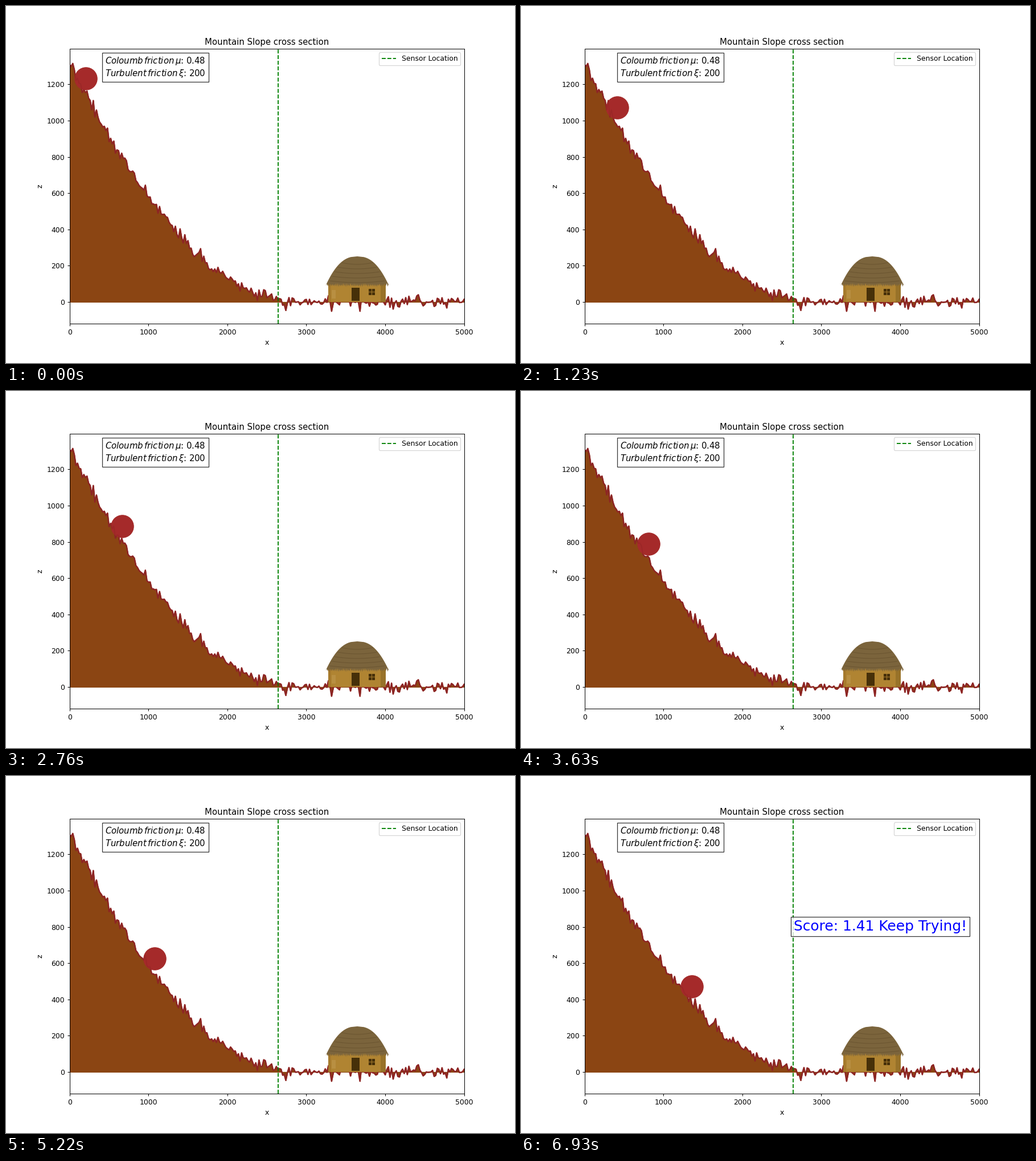
Recreate the animation shown at these times as a matplotlib script. Size 894 px wide and 626 px high, loop 8000 ms.

```python
import math

import matplotlib.pyplot as plt
import numpy as np
from matplotlib.animation import FuncAnimation
from matplotlib.patches import Polygon, Rectangle
from matplotlib.transforms import Affine2D

W, H, DPI = 894, 626, 89.4
FRAMES, INTERVAL = 250, 32
STEP_MS, LAST_STEP = 30, 231
PEAK, FOOT = 1320, 2800

# The small margin keeps the canvas from rounding down a pixel
fig, ax = plt.subplots(figsize=((W + 0.01) / DPI, (H + 0.01) / DPI), dpi=DPI)
pixels = Affine2D().scale(1 / W, -1 / H).translate(0, 1) + fig.transFigure
rng = np.random.default_rng(4)


def slope(x):
    return PEAK * np.clip(1 - x / FOOT, 0, 1) ** 1.85


def poly(points, color):
    ax.add_patch(Polygon(points, color=color, lw=0, zorder=4,
                         transform=pixels))


def rect(x0, y0, x1, y1, color):
    ax.add_patch(Rectangle((x0, y0), x1 - x0, y1 - y0, color=color, lw=0,
                           zorder=4, transform=pixels))


def draw_terrain():
    x = np.arange(0, 5001, 20)
    z = slope(x) + np.clip(rng.normal(0, 18, x.size), -51, 54)
    ax.fill_between(x, z, color="saddlebrown", zorder=1)
    ax.plot(x, z, color="#922626", lw=2, zorder=2)
    # Faint trace of the ground across the ball
    ax.plot(x, z, color="#802020", lw=1.5, alpha=0.25, zorder=3.5)


def roof_half(y):
    return 54 * ((y - 439) / 48) ** 0.42


def draw_hut():
    mid = 617
    # Walls
    rect(566, 484, 667, 519.5, "#b08432")
    rect(566, 484, 571, 519.5, "#a67a2c")
    rect(572, 498, 579, 513, "#b88f42")
    rect(658, 484, 667, 519.5, "#987229")
    # Door and window
    rect(607, 494, 620.5, 517, "#463009")
    rect(637, 496.5, 648, 507, "#463009")
    rect(642, 496.5, 643, 507, "#a67a2c")
    rect(637, 501, 648, 502, "#a67a2c")
    # Thatched roof with ragged eaves
    y = np.linspace(439, 487, 40)
    half = roof_half(y)
    eaves = np.linspace(mid + 55, mid - 55, 70)
    ragged = 487 + 4.5 * (np.arange(70) % 2) + rng.uniform(-1, 1, 70)
    xs = np.concatenate([mid - half[::-1], mid + half, eaves])
    ys = np.concatenate([y[::-1], y, ragged])
    poly(np.column_stack([xs, ys]), "#7b643c")
    for y in range(450, 485, 8):
        x = np.linspace(-1, 1, 40)
        ax.plot(mid + 0.93 * roof_half(y) * x, y + 3 - 3 * x ** 2,
                color="#6b5531", lw=0.8, zorder=4.5, transform=pixels)


def boxed(x, z, text, **style):
    return ax.text(x, z, text, va="center", zorder=5,
                   bbox=dict(facecolor="white", alpha=0.8), **style)


draw_terrain()
draw_hut()
ax.set(xlim=(0, 5000), ylim=(-120, 1396), xlabel="x", ylabel="z",
       title="Mountain Slope cross section")
sensor = ax.axvline(2640, color="green", ls="--", label="Sensor Location")
ax.legend(handles=[sensor], loc="upper right")
boxed(450, 1294, "$Coloumb\\/friction\\/\\mu$: 0.48\n"
                 "$Turbulent\\/friction\\/\\xi$: 200", fontsize=12)
score = boxed(3750, 801, "Score: 1.41 Keep Trying!", fontsize=20,
              color="blue", ha="center")
ball, = ax.plot([], [], "o", color="brown", ms=31.6, zorder=3)


def update(frame):
    step = min(math.ceil(frame * INTERVAL / STEP_MS), LAST_STEP)
    x = 205 + 5 * step
    ball.set_data([x], [slope(x) + 86])
    score.set_visible(step == LAST_STEP)
    return ball, score


anim = FuncAnimation(fig, update, frames=FRAMES, interval=INTERVAL,
                     repeat=True, repeat_delay=0)
plt.show()
```
